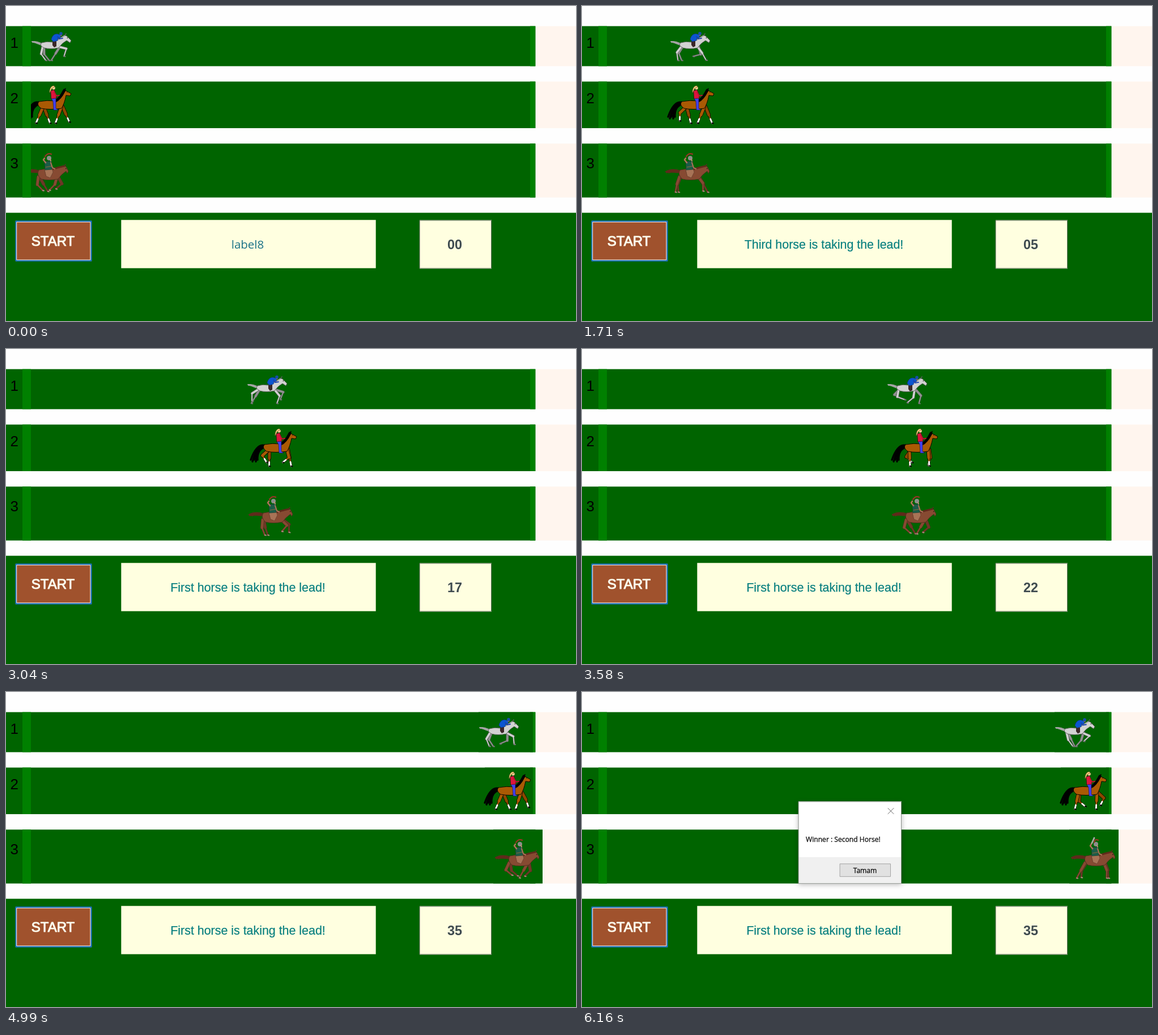
Write an HTML page with a canvas that moves like this. It is 1006 px wide and 557 px high and loops after 6.24 s.

```html
<!DOCTYPE html>
<html lang="en">
<head>
<meta charset="utf-8">
<title>Horse race</title>
<style>
  html, body { margin: 0; width: 100%; height: 100%; overflow: hidden; background: #fefefe; }
  canvas { display: block; }
</style>
</head>
<body>
<canvas id="stage" width="1006" height="557"></canvas>
<script>
const ctx = document.getElementById('stage').getContext('2d');
const LOOP = 6240, RACE_START = 1095, TICK = 110, LAST_TICK = 35, DIALOG_AT = 5070;
const GREEN = '#006400', LIME = '#008000', CREAM = '#ffffe0';
const SANS = '"Liberation Sans", Arial, sans-serif';
const HUMANIST = '"Open Sans", "Noto Sans", sans-serif';
const CURSOR = new Path2D('M0 0V16L4 12.5L6.5 18.2L9 17.1L6.6 11.6H11.5Z');

const mix = (a, b, p) => a + (b - a) * p;
const between = (a, b, p) => [mix(a[0], b[0], p), mix(a[1], b[1], p)];

function rect(x, y, w, h, color) {
  ctx.fillStyle = color;
  ctx.fillRect(x, y, w, h);
}

function frame(x, y, w, h, color, width = 1) {
  ctx.strokeStyle = color;
  ctx.lineWidth = width;
  ctx.strokeRect(x + width / 2, y + width / 2, w - width, h - width);
}

function text(str, x, y, font, color, weight = 0, align = 'center') {
  ctx.font = font;
  ctx.fillStyle = ctx.strokeStyle = color;
  ctx.textAlign = align;
  ctx.fillText(str, x, y);
  if (!weight) return;
  ctx.lineWidth = weight;
  ctx.strokeText(str, x, y);
}

function shape(d, fill, stroke, width = 0.6) {
  const path = new Path2D(d);
  ctx.fillStyle = fill;
  ctx.fill(path);
  if (!stroke) return;
  ctx.strokeStyle = stroke;
  ctx.lineWidth = width;
  ctx.stroke(path);
}

function dot(x, y, r, color) {
  ctx.fillStyle = color;
  ctx.beginPath();
  ctx.arc(x, y, r, 0, 7);
  ctx.fill();
}

function line(points, color, width) {
  ctx.strokeStyle = color;
  ctx.lineWidth = width;
  ctx.beginPath();
  points.forEach(([x, y]) => ctx.lineTo(x, y));
  ctx.stroke();
}

function curve([x, y], [cx, cy], [ex, ey], color, width) {
  ctx.strokeStyle = color;
  ctx.lineWidth = width;
  ctx.beginPath();
  ctx.moveTo(x, y);
  ctx.quadraticCurveTo(cx, cy, ex, ey);
  ctx.stroke();
}

// The hoof slides back along the ground, then swings forward in the air.
function drawLeg(horse, hip, side, lag, bend, phase) {
  const angle = 2 * Math.PI * (phase - lag);
  const { coat, edge, shade, sock, limb } = horse;
  const hoof = [
    hip[0] + side * horse.spread + horse.reach * Math.cos(angle),
    horse.ground - horse.lift * Math.max(0, -Math.sin(angle))
  ];
  const top = [hip[0] + side, hip[1]];
  const dx = hoof[0] - top[0], dy = hoof[1] - top[1];
  const d = Math.hypot(dx, dy);
  const h = bend * Math.sqrt(Math.max(0, 196 - d * d / 4)) / d;
  const mid = between(top, hoof, 0.5);
  const knee = [mid[0] + dy * h, mid[1] - dx * h];
  const toe = [hoof[0] + 2, hoof[1] + 0.5];
  const color = side < 0 ? coat : shade;
  line([top, knee], edge, limb + 1.4);
  line([knee, hoof], edge, limb / 2 + 1.2);
  line([top, knee], color, limb);
  line([knee, hoof], color, limb / 2);
  if (sock) line([between(knee, hoof, 0.5), hoof], sock, 2.8);
  line([hoof, toe], horse.hoof, 2.2);
}

function drawTail({ rump: [x, y], tail: [tx, ty], bushy, hair }) {
  for (let i = 0; i < 5; i++) {
    const tip = [tx + i * bushy, ty + i % 2 * bushy];
    curve([x + 1, y + 2 + i * 0.6], [mix(x, tx, 0.55), y - 3 + i * bushy], tip, hair, 1.2 + bushy * 0.7);
  }
}

function drawBody({ rump, chest, poll, muzzle, coat, edge, hair, mane }) {
  const [rx, ry] = rump, [cx, cy] = chest, [px, py] = poll, [mx, my] = muzzle;
  const middle = (rx + cx) / 2, withers = [cx - 11, ry - 1];
  shape(`M${rx} ${ry}Q${middle - 5} ${ry - 3} ${withers}Q${cx - 2} ${ry - 3} ${px} ${py}
    L${px + 3} ${py + 1}L${mx} ${my}L${mx - 2} ${my + 4}L${px + 3} ${py + 9}
    Q${cx + 5} ${cy - 8} ${cx} ${cy}Q${middle} ${cy + 3} ${rx + 4} ${cy}
    Q${rx - 5} ${(ry + cy) / 2} ${rx} ${ry}Z`, coat, edge, 0.9);
  curve(withers, [cx - 3, ry - 4], poll, hair, mane);
  line([[px, py], [px + 2, py - 3]], edge, 1.6);
  dot(mix(px, mx, 0.4), mix(py, my, 0.4) + 0.8, 0.8, '#181410');
}

function jockey(phase) {
  ctx.translate(0, 1 - Math.cos(2 * Math.PI * (phase - 0.1)));
  shape('M38 62L45 62L45 71L41 73L38 69Z', '#3b2728');
  shape('M36 59C37 53 41 49 46 49L53 51L52 56L48 56L47 61L40 63Z', '#0b55d0', '#123078');
  line([[47, 54], [50, 58], [56, 57]], '#1a3fb0', 1.8);
  dot(53, 51, 2, '#806060');
  dot(53, 48.5, 2.8, '#184fa8');
}

function lady() {
  shape('M46 163L54 162L54 181L58 184L50 184L49 169Z', '#4340ee', '#15154a');
  shape('M45 150L51 148L54 156L55 163L46 164Z', '#dc143c', '#30040e');
  line([[51, 152], [55, 159], [60, 158]], '#c01030', 2);
  dot(50, 145, 2.8, '#ffcf98');
  shape('M43 154C42 148 45 140 51 141L52 143L47 146Z', '#f0c878', '#3a2a08', 0.5);
}

function warrior(phase) {
  const raised = phase > 0.4 && phase < 0.88;
  const hand = raised ? [40, 267] : [39, 269];
  shape('M39 288L52 287L54 294L49 304L42 301Z', '#a87356', '#5a3a2a');
  shape('M39 275L51 274L52 289L40 290Z', '#1d5c48', '#18382c');
  line([[41, 285], [52, 283]], '#8a6a3a', 1.2);
  line([[50, 277], [53, 286], [57, 288]], '#a87058', 2.2);
  line([[41, 277], [37, 272], hand], '#b07058', 2.6);
  dot(47, 269, 4, '#8b8f8c');
  line([[49, 271], [50, 274]], '#c09078', 2);
  if (raised) line([hand, [44, 258]], '#a9aaa5', 2.8);
  curve(raised ? [44, 266] : [40, 266], [45, 259], [51, 262], '#983426', 2.2);
}

const horses = [
  {
    lane: [35.6, 70.8], home: 44, speed: 22.2, gain: 0.011, boxRight: 96, period: 413, rider: jockey,
    rump: [19, 65], chest: [49, 74], poll: [60, 52], muzzle: [71, 61], tail: [2, 63],
    hind: [22, 71], front: [50, 72], lags: [0.8, 0.88, 0.15, 0.5],
    reach: 14, spread: 0, ground: 96, lift: 9, limb: 3.4, bushy: 1, mane: 1.8,
    coat: '#d2d2d2', shade: '#929292', edge: '#585c58', hair: '#a4a4a4', hoof: '#777777'
  },
  {
    lane: [133.6, 82.4], home: 34, speed: 23.6, gain: -0.012, boxRight: 85, period: 417, rider: lady,
    rump: [24, 169], chest: [64, 181], poll: [69, 149], muzzle: [81, 155], tail: [0, 196],
    hind: [32, 179], front: [65, 178], lags: [0.5, 0.9, 0.6, 0.05],
    reach: 7, spread: 6, ground: 207, lift: 7, limb: 5, bushy: 3, mane: 5,
    coat: '#aa5a04', shade: '#8c4700', edge: '#000000', hair: '#000000', hoof: '#000000', sock: '#ffffff'
  },
  {
    lane: [243.3, 95.3], home: 29, speed: 22.9, gain: 0.024, boxRight: 87, period: 720, rider: warrior,
    rump: [29, 290], chest: [63, 306], poll: [74, 283], muzzle: [81, 292], tail: [4, 293],
    hind: [29, 302], front: [62, 302], lags: [0.07, 0.03, 0.42, 0.35],
    reach: 12, spread: 4, ground: 329, lift: 7, limb: 4.4, bushy: 1.6, mane: 3,
    coat: '#874a32', shade: '#6e3826', edge: '#50301f', hair: '#5f2b1b', hoof: '#a58a7c'
  }
];

function drawHorse(horse, tick, time) {
  const phase = time / horse.period % 1;
  const x = Math.round(horse.home + tick * (horse.speed + horse.gain * tick));
  const right = x + horse.boxRight;
  const [top, height] = horse.lane;
  const { hind, front, lags } = horse;
  if (right > 925) rect(x, top, right - x, height, GREEN);

  ctx.save();
  ctx.beginPath();
  ctx.rect(44, top, 962, height);
  ctx.clip();
  ctx.translate(x, 0);
  drawTail(horse);
  drawLeg(horse, hind, 1, lags[1], -1, phase);
  drawLeg(horse, front, 1, lags[3], 1, phase);
  drawLeg(horse, hind, -1, lags[0], -1, phase);
  drawLeg(horse, front, -1, lags[2], 1, phase);
  drawBody(horse);
  horse.rider(phase);
  ctx.restore();
}

function drawTrack() {
  rect(0, 0, 1006, 557, '#fefefe');
  horses.forEach(({ lane: [y, h] }, i) => {
    rect(934, y, 72, h, '#fff5ee');
    rect(0, y, 934.3, h, GREEN);
    rect(29, y, 15, h, LIME);
    rect(925, y, 9.3, h, LIME);
    text(i + 1, 7.5, y + (i ? 38.5 + (i - 1) * 5 : 38.5), `26px ${SANS}`, '#000', 0, 'left');
  });
  rect(0, 365.6, 1006, 192, GREEN);
}

function leader(time) {
  const third = time < 2960 || (time > 3600 && time < 3860);
  return (third ? 'Third' : 'First') + ' horse is taking the lead!';
}

function drawPanel(time, tick, hover) {
  const inset = hover ? 1 : 2;
  rect(16.6, 379.6, 134.8, 71.8, '#a0522d');
  frame(16.6, 379.6, 134.8, 71.8, '#0078d7', inset);
  frame(16.6 + inset, 379.6 + inset, 134.8 - 2 * inset, 71.8 - 2 * inset, '#f4f4f4', 3 - inset);
  text('START', 83, 424, `24px ${SANS}`, '#fffff0', 1);

  rect(203.3, 378.3, 449.4, 85.3, CREAM);
  if (tick) text(leader(time), 427, 429, `21.4px ${SANS}`, '#0b8080', 0.25);
  else text('label8', 426.5, 429, `20.5px ${HUMANIST}`, '#1b7288');

  rect(730, 378.6, 127, 85.8, CREAM);
  frame(730, 378.6, 127, 85.8, '#6c7468');
  text(String(tick).padStart(2, '0'), 792, 430, `bold 23.4px ${SANS}`, '#3f4b50');
}

function drawCursor(x, y) {
  ctx.save();
  ctx.translate(x, y);
  ctx.fillStyle = '#fff';
  ctx.strokeStyle = '#000';
  ctx.lineWidth = 1;
  ctx.fill(CURSOR);
  ctx.stroke(CURSOR);
  ctx.restore();
}

function drawDialog() {
  ctx.save();
  ctx.shadowColor = 'rgba(0,0,0,.28)';
  ctx.shadowBlur = 9;
  ctx.shadowOffsetY = 2;
  rect(382, 193.4, 182, 145.8, '#fff');
  ctx.restore();
  rect(382, 292, 182, 47, '#f0f0f0');
  frame(382, 193.4, 182, 145.8, '#8a908a');
  line([[540, 205.5], [550, 215.5]], '#666', 1);
  line([[550, 205.5], [540, 215.5]], '#666', 1);
  text('Winner : Second Horse!', 395, 265, `12.1px ${HUMANIST}`, '#111', 0.3, 'left');
  rect(455, 303.4, 90, 23.4, '#e1e1e1');
  frame(455, 303.4, 90, 23.4, '#a4a4a4');
  text('Tamam', 499.5, 320, `12.1px ${HUMANIST}`, '#111', 0.3);
}

function draw(now) {
  const time = now % LOOP;
  const tick = Math.min(LAST_TICK, Math.max(0, Math.floor((time - RACE_START) / TICK)));
  const p = Math.min(1, (time - 560) / 280);
  const pointing = time >= 560 && time < 1180;
  const cursorY = mix(494, 427, p);

  ctx.lineCap = ctx.lineJoin = 'round';
  drawTrack();
  horses.forEach(horse => drawHorse(horse, tick, time));
  drawPanel(time, tick, pointing && cursorY < 451);
  if (pointing) drawCursor(mix(84, 68, p) + 0.5, cursorY + 0.5);
  if (time >= DIALOG_AT) drawDialog();
}

const start = performance.now();
function loop() {
  draw(performance.now() - start);
  requestAnimationFrame(loop);
}
loop();
</script>
</body>
</html>
```
